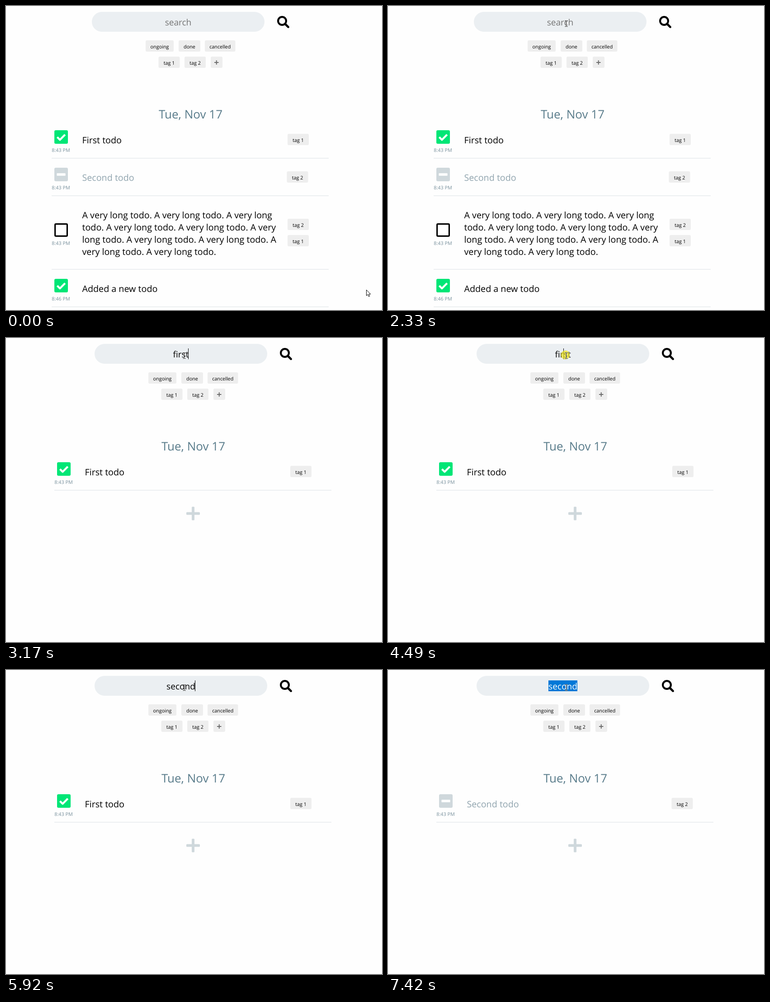
Write an HTML page that moves like this. It is 832x673 px and loops after 8 s.

```html
<!DOCTYPE html>
<html lang="en">
<head>
<meta charset="utf-8">
<title>Todo search</title>
<style>
  html, body { margin: 0; width: 100%; height: 100%; overflow: hidden; background: #fefefe; }
  svg { display: block; width: 100%; height: 100%; }
  text { font-family: "Open Sans", "Noto Sans", sans-serif; text-rendering: geometricPrecision; white-space: pre; }
  .mid { text-anchor: middle; }
  .input { font-size: 19.1px; }
  .date { font-size: 26px; fill: #587b8a; }
  .todo { font-size: 19.7px; }
  .faded { fill: #90a4ae; }
  .tag { font-size: 10.8px; }
  .time { font-size: 10.8px; fill: #78909c; }
  #beam { mix-blend-mode: difference; }
</style>
</head>
<body>
<svg viewBox="0 0 832 673">
  <rect width="832" height="673" fill="#fefefe"/>
  <g id="page">
    <rect x="190" y="13" width="382" height="44" rx="22" fill="#ebeff2"/>
    <rect id="selection" y="23" height="24" fill="#0078d7"/>
    <text id="query" class="input mid" x="381" y="43"></text>
    <g fill="none" stroke="#000">
      <circle cx="611" cy="33" r="8.9" stroke-width="4.2"/>
      <path d="M617.5 39.5L624.6 46.6" stroke-width="4.7" stroke-linecap="round"/>
    </g>
    <g id="filters"></g>
    <text class="date mid" x="408.5" y="249">Tue, Nov 17</text>
    <g id="rows"></g>
    <g id="add" fill="#cfd8dc">
      <rect x="393" y="385.5" width="30" height="6" rx="1.6"/>
      <rect x="405" y="373.5" width="6" height="30" rx="1.6"/>
    </g>
  </g>
  <rect id="caret" y="23" width="1" height="24"/>
  <circle id="click" cx="392.5" cy="37.5" r="10" fill="#ebe222" opacity=".72"/>
  <path id="beam" d="M-3 -6.5H-.8L0 -5.7L.8 -6.5H3M0 -5.7V5.7M-3 6.5H-.8L0 5.7L.8 6.5H3" fill="none" stroke="#fff"/>
  <path id="arrow" d="M.5 .5V13.3L3.5 10.6L5.6 15.3L7.7 14.4L5.7 9.9H9.8Z" fill="#fff" stroke="#000"/>
</svg>
<script>
const $ = id => document.getElementById(id);
const rect = (x, y, w, h, r, fill) =>
  `<rect x="${x}" y="${y}" width="${w}" height="${h}" rx="${r}" fill="${fill}"/>`;
const label = (cls, x, y, str) => `<text class="${cls}" x="${x}" y="${y}">${str}</text>`;
const tag = (str, x, y, w = 47) =>
  rect(x, y, w, 25, 3, '#eee') + label('tag mid', x + w / 2, y + 18, str);

const icons = {
  done: rect(0, 0, 30, 30, 3.2, '#00e676') +
    '<path d="M6.4 15.3L12.3 21.2L23.7 9.8" fill="none" stroke="#fff" stroke-width="4.3" stroke-linejoin="round"/>',
  cancelled: rect(0, 0, 30, 30, 3.2, '#cfd8dc') + rect(5.4, 12.3, 19.2, 5.4, .8, '#fff'),
  ongoing: '<rect x="1.6" y="1.6" width="26.8" height="26.8" rx="1.8" fill="none" stroke="#000" stroke-width="3.2"/>'
};

const longText = [
  'A very long todo. A very long todo. A very long',
  'todo. A very long todo. A very long todo. A very',
  'long todo. A very long todo. A very long todo. A',
  'very long todo. A very long todo.'
];

// y is the top of the icon; rule, text and tag positions hang off it.
function row({ y, state, lines, textY = y + 29, tags, rule = y + 61 }) {
  const cls = state === 'cancelled' ? 'todo faded' : 'todo';
  return `<g transform="translate(107 ${y})">${icons[state]}</g>` +
    label('time mid', 121.5, y + 48, y > 600 ? '8:46 PM' : '8:43 PM') +
    lines.map((s, i) => label(cls, 168.5, textY + 27 * i, s)).join('') +
    tags.map(([str, x, ty]) => tag(str, x, ty)).join('') +
    rect(101, rule, 613, 2, 0, '#eceff1');
}

const first = { y: 275, state: 'done', lines: ['First todo'], tags: [['tag 1', 623, 283]] };
const second = y => ({ y, state: 'cancelled', lines: ['Second todo'], tags: [['tag 2', 621.5, y + 8]] });
const views = {
  all: [
    first, second(358),
    { y: 481, state: 'ongoing', lines: longText, textY: 470, rule: 582,
      tags: [['tag 2', 623, 471], ['tag 1', 623, 507]] },
    { y: 604, state: 'done', lines: ['Added a new todo'], tags: [] }
  ],
  first: [first],
  second: [second(275)]
};

$('filters').innerHTML =
  tag('ongoing', 309, 76, 62) + tag('done', 382, 76, 48) + tag('cancelled', 440, 76, 67.5) +
  tag('tag 1', 337.5, 112) + tag('tag 2', 395, 112) + rect(453, 112, 26, 25, 3, '#eee') +
  '<path d="M461 125H470.5M465.75 120.25V129.75" stroke="#6b6b6b" stroke-width="2"/>';

// Step tables: [start ms, value...]
const typing = [
  [0, ''], [2570, 'f'], [2730, 'fi'], [2790, 'fir'], [2960, 'firs'], [3030, 'first'],
  [5200, 's'], [5370, 'se'], [5620, 'sec'], [5695, 'seco'], [5770, 'secon'], [5920, 'second']
];
const listing = [[0, 'all'], [3170, 'first'], [6170, 'second']];
// 'end' follows the text, a number is a clicked position
const carets = [
  [0, null], [1870, 'end'], [2330, null], [2570, 'end'], [3730, null], [4260, 'end'],
  [4490, 388], [4570, null], [5200, 'end'], [6700, null], [7270, 388], [7350, null]
];
const selecting = [[0, false], [4570, true], [5200, false], [7350, true]];
const clicks = [[0, false], [1800, true], [1930, false], [4420, true], [4720, false], [7200, true], [7420, false]];
const pointer = [
  [0, 797, 628], [70, 788, 555], [140, 768, 400], [220, 757, 312], [460, 756, 312],
  [1010, 744, 305], [1090, 702, 281], [1170, 642, 244], [1250, 580, 206], [1330, 521, 170],
  [1400, 478, 145], [1480, 453, 117], [1560, 428, 85], [1640, 407, 55], [1720, 394.5, 39]
];

const at = (table, t) => table.findLast(step => step[0] <= t).slice(1);
const show = (el, on) => { el.style.visibility = on ? 'visible' : 'hidden'; };
let shownView;

function draw(t) {
  const [view] = at(listing, t), [str] = at(typing, t), [caret] = at(carets, t);
  const [selected] = at(selecting, t), [pressed] = at(clicks, t), [px, py] = at(pointer, t);

  if (view !== shownView) {
    $('rows').innerHTML = views[view].map(row).join('');
    shownView = view;
  }
  const shift = view === 'all' ? 0 : 6;
  $('page').setAttribute('transform', `translate(${shift} 0)`);
  show($('add'), shift);

  const query = $('query');
  const placeholder = !str && t < 2570;
  query.textContent = placeholder ? 'search' : str;
  query.setAttribute('fill', placeholder ? '#757575' : selected ? '#fff' : '#000');
  const width = placeholder ? 0 : query.getComputedTextLength();

  $('selection').setAttribute('x', Math.round(381 - width / 2));
  $('selection').setAttribute('width', Math.round(width));
  show($('selection'), selected);

  const caretX = caret === 'end' ? Math.floor(381 + shift + width / 2 - .5) : caret;
  $('caret').setAttribute('x', caretX ?? 0);
  show($('caret'), caret !== null);
  show($('click'), pressed);

  const overInput = py < 57;
  for (const id of ['beam', 'arrow']) {
    $(id).setAttribute('transform', `translate(${px} ${py})`);
    show($(id), overInput === (id === 'beam'));
  }
}

const start = performance.now();
function tick() {
  draw((performance.now() - start) % 8000);
  requestAnimationFrame(tick);
}
tick();
</script>
</body>
</html>
```
